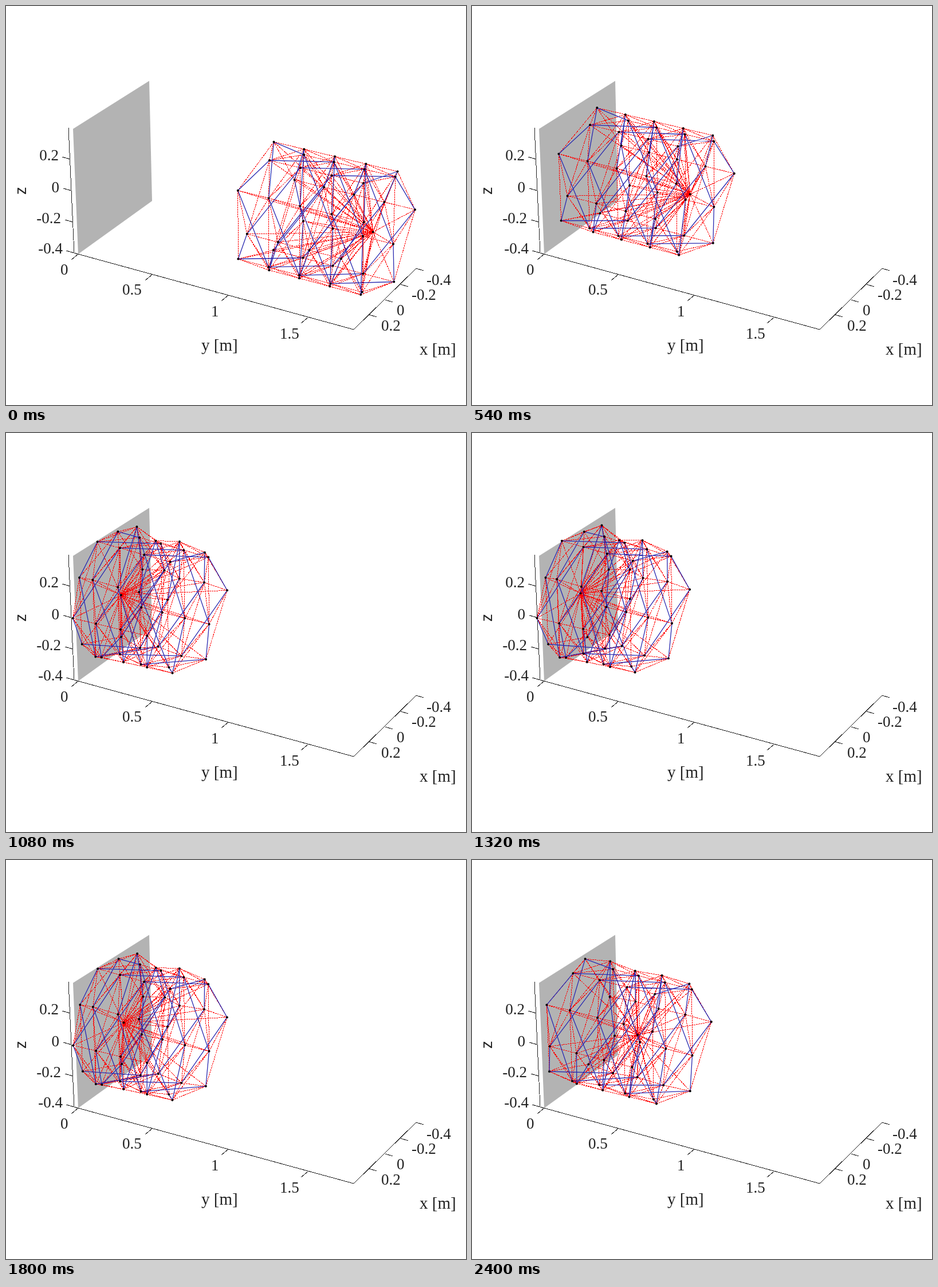
Write an HTML page that moves like this. It is 803x698 px and loops after 2.46 s.

```html
<!DOCTYPE html>
<html lang="en">
<head>
<meta charset="utf-8">
<title>Lattice cylinder against a wall</title>
<style>
html, body { margin: 0; width: 100%; height: 100%; overflow: hidden; background: #fff; }
svg { display: block; }
text { font: 27px "Liberation Serif", serif; fill: #222; }
.name { font-size: 29px; }
.sans { font: 27px "Liberation Sans", sans-serif; }
path { fill: none; }
#cables { stroke: #f00; stroke-width: 1; stroke-dasharray: 3 1; shape-rendering: crispEdges; }
#struts { stroke: #2a2ab0; stroke-width: 1.3; }
#nodes { stroke: #000; stroke-width: 4; stroke-linecap: round; }
#axes { stroke: #222; stroke-width: 1; shape-rendering: crispEdges; }
</style>
</head>
<body>
<svg width="803" height="698" viewBox="0 0 803 698">
  <polygon points="117,215 250,131 255,341 126,434" fill="#b3b3b3"/>
  <path id="axes"/>
  <g id="labels"></g>
  <path id="cables"/>
  <path id="struts"/>
  <path id="nodes"/>
</svg>
<script>
// Times in ms, lengths in m
const LOOP = 2460, STEP = 60, HIT = 540, SETTLED = 1080, END = 2400;
const RINGS = 9, SIDES = 5, HUB = RINGS * SIDES;
const START = 1.002, LENGTH = 0.773, HUB_OFFSET = 0.688, RADIUS = 0.365;

// [time, value] points of the rebound
const BODY = [[SETTLED, .587], [1560, .551], [2040, .628], [END, .701]];
const CORE = [[SETTLED, .048], [1560, -.011], [2040, .182], [END, .392]];

const byId = id => document.getElementById(id);

// Smooth curve through the points
function curve(points, t) {
  const last = points.length - 1;
  const slope = i => {
    const [t0, v0] = points[Math.max(i - 1, 0)], [t1, v1] = points[Math.min(i + 1, last)];
    return (v1 - v0) / (t1 - t0);
  };
  let i = 0;
  while (i < last - 1 && t > points[i + 1][0]) i++;
  const [t0, v0] = points[i], [t1, v1] = points[i + 1];
  const h = t1 - t0, s = (t - t0) / h, r = 1 - s;
  return v0 * (1 + 2 * s) * r * r + v1 * s * s * (3 - 2 * s)
    + h * s * r * (slope(i) * r - slope(i + 1) * s);
}

const flown = t => 1.692 * t / 1000 + 0.1165 * (t / 1000) ** 2;

// Free flight, braking at the initial speed's slope, then the rebound
function travel(start, rebound, t) {
  if (t <= HIT) return start - flown(t);
  if (t >= SETTLED) return rebound(t);
  const goal = rebound(SETTLED), drop = start - flown(HIT) - goal;
  const s = (t - HIT) / (SETTLED - HIT);
  return goal + drop * (1 - s) ** Math.max(1, 0.97 / drop);
}

const squash = t => 1 - curve(BODY, t) / LENGTH;

// Squeezed body: rings crowd towards the wall, odd rings even more
function squeezed(i, t) {
  const s = i / (RINGS - 1), q = squash(t);
  const front = -0.036 + 0.009 * (t - SETTLED) / (END - SETTLED);
  const crowd = 2 * q ** 1.5 * s * (1 - s);
  const dip = i % 2 * 0.24 * q * (1 - s) ** 2;
  return front + curve(BODY, t) * (s - crowd) - dip;
}

const ringDepth = (i, t) =>
  travel(START + LENGTH * i / (RINGS - 1), u => squeezed(i, u), t);
const hubDepth = t => travel(START + HUB_OFFSET, u => curve(CORE, u), t);

// Two bulges along the body, the one near the wall larger
function girth(i, t) {
  const s = i / (RINGS - 1);
  const grow = Math.min(1, Math.max(0, (t - HIT) / (SETTLED - HIT)));
  return RADIUS + 0.225 * grow * squash(Math.max(t, SETTLED))
    * (1.25 - s) * Math.sin(2 * Math.PI * s) ** 2;
}

// Perspective view; the cylinder's axis runs along y at x = z = 0
function project(x, y, z) {
  x += 0.4;
  z += 0.4;
  const w = 1 + 0.0719 * x - 0.0343 * y - 0.035 * z;
  return [
    ((126 + 179.6 * x + 249.3 * y - 15.3 * z) / w).toFixed(1),
    ((434 - 92.5 * x + 55.4 * y - 281 * z) / w).toFixed(1)
  ];
}

const id = (i, j) => i * SIDES + (j + SIDES) % SIDES;
const struts = [], cables = [];
for (let i = 0; i < RINGS; i++) {
  const odd = i % 2;
  for (let j = 0; j < SIDES; j++) {
    const n = id(i, j);
    cables.push([n, id(i, j + 1)], [n, HUB]);
    if (i + 2 < RINGS) {
      cables.push([n, id(i + 2, j)]);
      struts.push([n, id(i + 2, odd ? j - 1 : j + 1)]);
    }
    if (!odd) continue;
    for (const k of [i - 1, i + 1]) {
      for (const side of [0, 1]) {
        const rim = side ? k === 0 : k === RINGS - 1;
        (rim ? struts : cables).push([n, id(k, j + side)]);
      }
    }
  }
}

function draw(t) {
  const p = [];
  for (let i = 0; i < RINGS; i++) {
    const y = ringDepth(i, t), r = girth(i, t);
    for (let j = 0; j < SIDES; j++) {
      const a = (j + i % 2 / 2) * 2 * Math.PI / SIDES;
      p.push(project(r * Math.cos(a), y, r * Math.sin(a)));
    }
  }
  p.push(project(0, hubDepth(t), 0));
  const join = list => list.map(([a, b]) => `M${p[a]}L${p[b]}`).join("");
  byId("cables").setAttribute("d", join(cables));
  byId("struts").setAttribute("d", join(struts));
  byId("nodes").setAttribute("d", p.map(q => `M${q}h.01`).join(""));
}

function drawAxes() {
  let d = "M109 213L119 432L126 434L607 566L716 459";
  const ticks = (points, dx, dy) => {
    for (const [x, y] of points) d += `M${x} ${y}l${dx} ${dy}`;
  };
  ticks([[112, 268], [114, 323], [117, 378], [119, 432]], -14, -4);
  ticks([[126, 434], [255, 470], [388, 506], [527, 545]], -12, 10);
  ticks([[716, 459], [689, 487], [662, 514], [634, 540]], 13, 4);
  byId("axes").setAttribute("d", d);

  const label = (s, x, y, extra = "") => `<text x="${x}" y="${y}" ${extra}>${s}</text>`;
  const end = 'text-anchor="end"', name = 'class="name"';
  byId("labels").innerHTML =
    label("0.2", 92, 270, end) + label("0", 93, 326, end) +
    label("-0.2", 96, 380, end) + label("-0.4", 99, 433, end) +
    label("0", 95, 470) + label("0.5", 203, 505) +
    label("1", 358, 543) + label("1.5", 478, 582) +
    label("-0.4", 734, 488) + label("-0.2", 708, 514) +
    label("0", 682, 541) + label("0.2", 655, 568) +
    label("y [m]", 341, 603, name) + label("x [m]", 722, 610, name) +
    label("z", 0, 0, 'class="sans" transform="translate(35 330) rotate(-90)"');
}

function tick(now) {
  draw(Math.floor(now % LOOP / STEP) * STEP);
  requestAnimationFrame(tick);
}

drawAxes();
draw(0);
requestAnimationFrame(tick);
</script>
</body>
</html>
```
